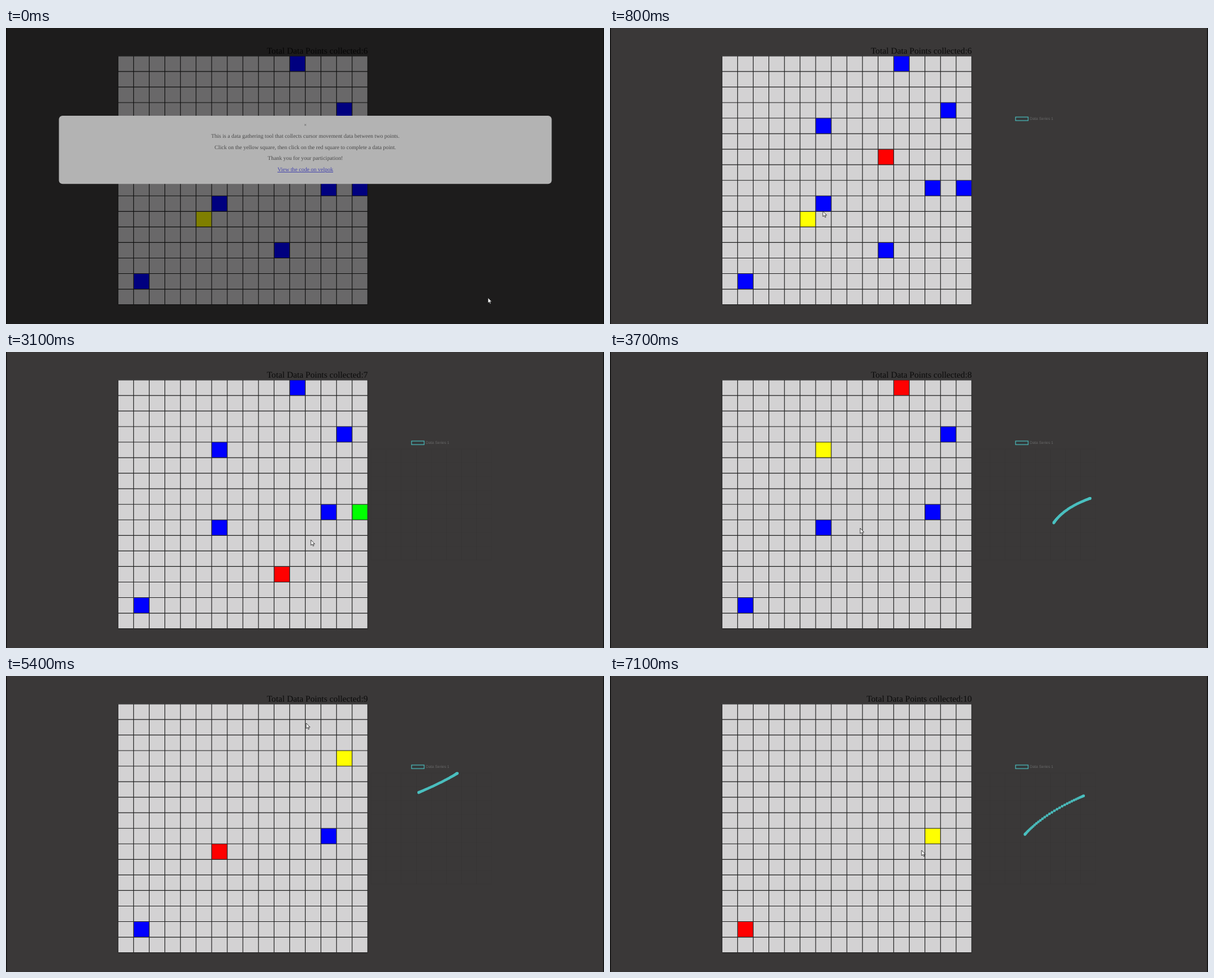
Recreate the animation shown at these times as an HTML page. Size 1000 by 496 pixels, loop 7.2 s.

```html
<!DOCTYPE html>
<html lang="en">
<head>
<meta charset="utf-8">
<title>Cursor data tool</title>
<style>
html, body { margin: 0; width: 100%; height: 100%; overflow: hidden; background: #3a3838; }
svg { display: block; width: 100vw; height: 100vh; }
text { text-rendering: geometricPrecision; }
.serif { font-family: "Liberation Serif", "Times New Roman", serif; }
.sans { font-family: "Liberation Sans", Arial, sans-serif; }
</style>
</head>
<body>
<svg viewBox="0 0 1000 496" preserveAspectRatio="none">
  <rect width="1000" height="496" fill="#3a3838"/>
  <text id="count" class="serif" x="605" y="43.3" font-size="14.6" text-anchor="end" fill="#0a0a0a"></text>
  <rect x="187" y="46.5" width="418" height="417" fill="#d3d2d3"/>
  <g id="cells"></g>
  <path id="lines" stroke="#252525" stroke-width="1.15" fill="none"/>
  <path id="axes" stroke="#000" stroke-opacity=".04" fill="none"/>
  <rect x="678.2" y="149.2" width="21" height="6" fill="#353b3c" stroke="#4bc0c0" stroke-width="1.1"/>
  <text class="sans" x="702" y="154" font-size="6.5" fill="#676767">Data Series 1</text>
  <g id="chart" stroke="#4bc0c0" fill="none">
    <path id="trace" stroke-width="1.4"/>
    <g id="dots" fill="#4bc0c0" fill-opacity=".6" stroke-width="1.1"></g>
  </g>
  <g id="modal">
    <rect width="1000" height="496" fill="#000" fill-opacity=".5"/>
    <rect x="88.5" y="147" width="824" height="114.3" rx="6" fill="#b3b3b3"/>
    <g class="serif" font-size="9.4" text-anchor="middle" fill="#4b4b4b">
      <text x="500.5" y="164.6" font-size="8">×</text>
      <text x="500.5" y="184">This is a data gathering tool that collects cursor movement data between two points.</text>
      <text x="500.5" y="202.5">Click on the yellow square, then click on the red square to complete a data point.</text>
      <text x="500.5" y="221">Thank you for your participation!</text>
      <text x="500.5" y="240" fill="#4141ad" text-decoration="underline">View the code on velpok</text>
    </g>
  </g>
  <g id="cursor">
    <circle id="busy" cx="6" cy="0" r="3.6" fill="#86aee0" stroke="#17509c" stroke-width="1.8"/>
    <path d="M0 0V9L2.1 7.2L3.6 10.3L5 9.7L3.6 6.7H6.4Z" fill="#fff" stroke="#1c1c1c" stroke-width=".8"/>
  </g>
  <path d="M.6 0V496M999.3 0V496" stroke="#0d0d0d" stroke-width="1.4"/>
</svg>
<script>
const LOOP = 7200, STEP = 100;
const NS = 'http://www.w3.org/2000/svg';
const $ = id => document.getElementById(id);

// Grid origin, pitch and size
const X0 = 187.3, Y0 = 46.8, CW = 26.1, CH = 26.05, N = 16;

// Each round: a pause on the way, the click on yellow (a), the bend of the
// path, the click on red (b), and how many cursor points were recorded
const rounds = [
  { pause: [356, 307], at: 800, start: 1000, end: 1995,
    a: [325, 320], bend: [395, 275], b: [460, 229], n: 50 },
  { pause: [470, 232], at: 2300, start: 2900, end: 3295,
    a: [590, 268], bend: [497, 308], b: [460.5, 371.7], n: 60 },
  { pause: [342, 157], at: 4300, start: 4400, end: 5146,
    a: [350, 164], bend: [440, 106], b: [487, 61], n: 50 },
  { pause: [502, 79], at: 5400, start: 5800, end: 6395,
    a: [566.6, 144], bend: [428, 207], b: [358, 288], n: 36 },
  { pause: [521, 292], at: 7100, start: LOOP, end: LOOP,
    a: [539, 268], b: [226, 424] }
];

const clamp = v => Math.min(1, Math.max(0, v));
const smooth = s => s * s * (3 - 2 * s);
const mix = (p, q, f) => p.map((v, i) => v + (q[i] - v) * f);
const curve = (p, c, q, f) => mix(mix(p, c, f), mix(c, q, f), f);

// Cursor stops; a stop with a bend is reached along a curve
const stops = [
  { t: 0, p: [806, 452] }, { t: 600, p: [500, 161] }, { t: 700, p: [500, 161] },
  ...rounds.flatMap(r => [
    { t: r.at, p: r.pause },
    { t: r.start, p: r.a },
    { t: r.end, p: r.b, bend: r.bend }
  ])
];

function cursorAt(t) {
  const i = stops.findIndex(s => s.t > t);
  const from = stops[i - 1], to = stops[i];
  const f = smooth((t - from.t) / (to.t - from.t));
  return to.bend ? curve(from.p, to.bend, to.p, f) : mix(from.p, to.p, f);
}

function add(parent, tag, attrs) {
  const el = document.createElementNS(NS, tag);
  for (const k in attrs) el.setAttribute(k, attrs[k]);
  return parent.appendChild(el);
}

const show = (id, on) => $(id).setAttribute('visibility', on ? 'visible' : 'hidden');

// Lattice of lines: origin, pitch and number of cells each way
function lattice(x, y, w, h, n) {
  let d = '';
  for (let i = 0; i <= n; i++) {
    d += `M${x + i * w} ${y}v${n * h}M${x} ${y + i * h}h${n * w}`;
  }
  return d;
}
$('lines').setAttribute('d', lattice(X0, Y0, CW, CH, N));
$('axes').setAttribute('d', lattice(610.5, 162.5, 25.2, 23.25, 8));

// The cell under a click
function cell([x, y]) {
  return add($('cells'), 'rect', {
    x: X0 + Math.floor((x - X0) / CW) * CW,
    y: Y0 + Math.floor((y - Y0) / CH) * CH,
    width: CW, height: CH
  });
}
for (const r of rounds) {
  r.yellow = cell(r.a);
  r.red = cell(r.b);
}

function paintCells(t, now) {
  rounds.forEach((r, i) => {
    const idle = i < now ? 'none' : '#00f';
    r.yellow.setAttribute('fill', i !== now ? idle : t >= r.start ? '#0f0' : '#ff0');
    r.red.setAttribute('fill', i !== now ? idle : '#f00');
  });
}

// The recorded path, scaled to the chart, drops from the top axis
function paintChart(t, now) {
  const r = rounds[now - 1];
  const on = !!r && t < rounds[now].start;
  show('chart', on);
  if (!on) return;
  const k = 1 - (1 - clamp((t - r.end) / 1000)) ** 4;
  const pts = Array.from({ length: r.n + 1 }, (_, i) => {
    const [x, y] = curve(r.a, r.bend, r.b, smooth(i / r.n));
    return [525.4 + 0.4705 * x, 162 + (0.452 * y - 26) * k];
  });
  $('trace').setAttribute('d', 'M' + pts.join('L'));
  $('dots').replaceChildren();
  for (const [cx, cy] of pts) add($('dots'), 'circle', { cx, cy, r: 1.7 });
}

function draw(t) {
  const now = rounds.findIndex(r => t < r.end);
  const counted = rounds.filter(r => t >= r.end + STEP).length;
  $('count').textContent = 'Total Data Points collected:' + (6 + counted);
  paintCells(t, now);
  paintChart(t, now);
  show('modal', t < 800);
  show('axes', t >= 900);
  show('busy', rounds.some(r => t >= r.end && t < r.end + STEP));
  $('cursor').setAttribute('transform', `translate(${cursorAt(t)})`);
}

const begin = performance.now();
let last = -1;
function tick() {
  const t = Math.floor(((performance.now() - begin) % LOOP) / STEP) * STEP;
  if (t !== last) draw(last = t);
  requestAnimationFrame(tick);
}
tick();
</script>
</body>
</html>
```
